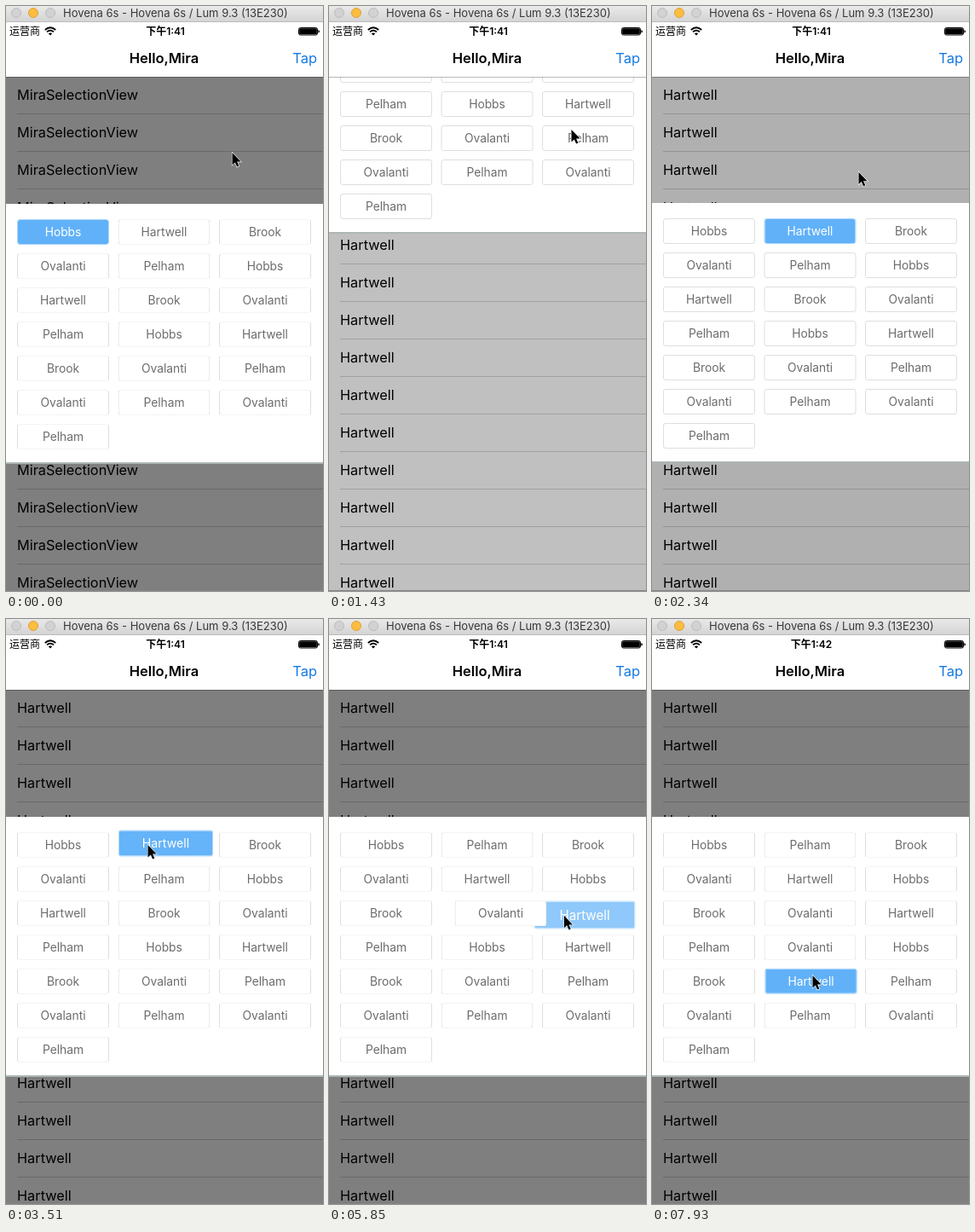
An HTML page that plays this animation: 372x686 px, repeating every 8 s.

```html
<!DOCTYPE html>
<html lang="zh-CN">
<head>
<meta charset="utf-8">
<title>Selection panel</title>
<style>
  html, body { margin: 0; width: 100%; height: 100%; overflow: hidden; background: #fff; }
  #stage {
    position: relative; width: 372px; height: 686px; overflow: hidden; background: #fff;
    font-family: Inter, "Noto Sans CJK SC", "Noto Sans CJK", sans-serif; color: #000; white-space: nowrap;
  }
  #stage div, #stage svg { position: absolute; box-sizing: border-box; }
  #list { left: 0; top: 83px; width: 100%; height: 603px; }
  .row { left: 13px; right: 0; height: 44px; line-height: 43px; font-size: 16.3px; border-bottom: 1px solid #d4d4d6; }
  #dim { left: 0; top: 83px; width: 100%; height: 603px; background: #000; }
  #edge { left: 0; bottom: 0; width: 100%; height: 1px; background: #848484; }
  #panel { left: 0; top: 0; width: 100%; height: 305px; background: #fff; border-bottom: 2px solid #aeb6b6; }
  .tile {
    left: 0; top: 0; width: 108px; height: 30px; border: 1px solid #dedede; border-radius: 3px;
    background: #fff; color: #6c6c6c; font-size: 13.8px; line-height: 28px; text-align: center;
  }
  .faint .tile { border-top-color: #f4f4f4; border-bottom-color: #f4f4f4; }
  #panel .picked { border-color: #a9d5fb; background: #61b1f8; background-clip: padding-box; color: #fff; }
  #nav {
    left: 0; top: 19px; width: 100%; height: 65px; background: #fff; background-clip: padding-box;
    border-bottom: 1px solid rgba(0, 0, 0, .28);
  }
  #carrier, #clock { top: 2px; line-height: 17px; font-size: 12px; }
  #carrier { left: 4px; }
  #clock { left: 0; width: 374px; text-align: center; font-weight: 600; }
  #heading { left: 0; top: 20px; width: 371px; line-height: 44px; text-align: center; font-size: 16.5px; font-weight: 600; }
  #tap { right: 7px; top: 20px; line-height: 44px; font-size: 16.5px; color: #1678e2; }
  #bar {
    left: 0; top: 0; width: 100%; height: 19px; border-bottom: 1px solid #bcbcbc;
    background: linear-gradient(#e9e9e9, #d4d4d4);
  }
  #bar .light { top: 2px; width: 12px; height: 12px; border-radius: 50%; background: #d2d2d2; border: 1px solid #bcbcbc; }
  #bar .amber { background: #fcbd40; border-color: #e0a136; }
  #caption { left: 67px; top: 0; line-height: 17px; font-size: 13px; color: #383838; }
  #cursor { left: 0; top: 0; overflow: visible; }
</style>
</head>
<body>
<div id="stage">
  <div id="list"></div>
  <div id="dim"></div>
  <div id="edge"></div>
  <div id="panel"></div>
  <div id="nav">
    <div id="carrier">运营商</div>
    <svg style="left:45px;top:5px" width="14" height="11" fill="none" stroke="#000" stroke-width="1.8">
      <path d="M.8 4Q7-1.6 13.2 4M3 6.4Q7 2.8 11 6.4"/>
      <path d="M7 10.6L4.8 8.3Q7 6.5 9.2 8.3Z" fill="#000" stroke="none"/>
    </svg>
    <div id="clock"></div>
    <svg style="left:343px;top:6px" width="26" height="10">
      <rect x=".5" y=".5" width="22" height="8.5" rx="2" fill="none" stroke="#000"/>
      <rect x="1.2" y="1.2" width="20.6" height="7.1" rx="1"/>
      <path d="M23.4 3Q25 3.4 25 4.8T23.4 6.5Z"/>
    </svg>
    <div id="heading">Hello,Mira</div>
    <div id="tap">Tap</div>
  </div>
  <div id="bar">
    <div class="light" style="left:6px"></div>
    <div class="light amber" style="left:26px"></div>
    <div class="light" style="left:46px"></div>
    <div id="caption">Hovena 6s - Hovena 6s / Lum 9.3 (13E230)</div>
  </div>
  <svg id="cursor" width="12" height="19">
    <path d="M-.5 0V14.4L2.8 11.4L5.1 16.6L7.3 15.6L5.1 10.6H9.6Z" stroke="#fff" stroke-width="1.2" paint-order="stroke"/>
  </svg>
</div>
<script>
const LOOP = 8000, STEP = 130;
const PICK = 1040, CLOSE = 1128, OPEN = 1820, LIFT = 3415, DROP = 7670, MINUTE = 6370;
const OPEN_Y = 232, TRAVEL = 535, HELD = 1;
const NAMES = ['Hobbs', 'Hartwell', 'Brook', 'Ovalanti', 'Pelham'];
const TILE_NAMES = [...NAMES, ...NAMES, ...NAMES, 'Ovalanti', 'Pelham', 'Ovalanti', 'Pelham'];

// [time, x, y] of the pointer tip
const POINTER = [
  [0, 266, 172], [390, 266, 172], [650, 240, 205], [910, 202, 258], [1170, 202, 258],
  [1430, 285, 145], [1650, 347, 60], [1820, 347, 62], [2080, 299, 134], [2470, 215, 225],
  [2860, 167, 264], [3510, 167, 265], [3900, 164, 295], [4200, 155, 307], [4550, 88, 338],
  [4810, 72, 350], [5000, 82, 350], [5300, 165, 348], [5700, 268, 346], [5950, 282, 349],
  [6250, 282, 380], [6500, 268, 391], [6760, 210, 393], [7000, 172, 393], [7350, 182, 414],
  [7600, 189, 418], [8000, 189, 418]
];
// [time, slot the held tile trades into]
const SWAPS = [[3900, 4], [4500, 6], [5200, 7], [5650, 8], [6250, 11], [6890, 10], [7300, 13]];

const $ = id => document.getElementById(id);
const mix = (a, b, k) => a + (b - a) * k;
const ramp = (t, from, length) => Math.min(1, Math.max(0, (t - from) / length));
const ease = k => k * k * (3 - 2 * k);
const easeOut = k => 1 - (1 - k) ** 2;
const slotAt = i => [13 + 118.5 * (i % 3), 18 + 40 * Math.floor(i / 3)];
const between = (a, b, k) => a.map((v, i) => mix(v, b[i], k));

function add(parent, cls, text) {
  const el = document.createElement('div');
  el.className = cls;
  el.textContent = text;
  parent.append(el);
  return el;
}

const rows = [...Array(14).keys()].map(i => {
  const row = add($('list'), 'row', '');
  row.style.top = i * 44 + 'px';
  return row;
});
const tiles = TILE_NAMES.map(name => add($('panel'), 'tile', name));

// Each swap sends the displaced tile to the slot the held one leaves.
const moves = [];
const order = tiles.map((_, i) => i);
let heldSlot = HELD;
for (const [time, slot] of SWAPS) {
  moves[order[slot]] = { time, from: slot, to: heldSlot };
  order[heldSlot] = order[slot];
  order[slot] = HELD;
  heldSlot = slot;
}

function pointerAt(t) {
  const i = Math.max(1, POINTER.findIndex(p => p[0] > t));
  const [a, b] = [POINTER[i - 1], POINTER[i]];
  return between(a.slice(1), b.slice(1), ramp(t, a[0], b[0] - a[0]));
}

function panelY(t) {
  if (t < OPEN) return OPEN_Y - TRAVEL * ease(ramp(t, CLOSE, 600));
  const s = 16.2 * (t - OPEN) / 1000;
  return OPEN_Y - TRAVEL * (1 + s) * Math.exp(-s);
}

function dimAt(t) {
  return 0.5 * (t < OPEN ? 1 - ease(ramp(t, CLOSE, 600)) : ease(ramp(t, OPEN, 900)));
}

function heldTile(t, [px, py]) {
  const late = ramp(t, 4900, 1800);
  const dragged = [px + mix(20.5, 26.5, late) - 54, py + mix(-2, 0.5, late) - 15 - OPEN_Y];
  const lift = ease(ramp(t, LIFT, 260)), land = easeOut(ramp(t, DROP, 320));
  const pos = t < LIFT ? slotAt(HELD) : between(dragged, slotAt(heldSlot), land);
  return { pos, raised: lift * (1 - land) };
}

function place(el, [x, y], scale = 1) {
  el.style.transform = `translate(${x}px, ${y}px) scale(${scale})`;
}

function draw(t) {
  const pointer = pointerAt(t);
  const label = t < PICK ? 'MiraSelectionView' : 'Hartwell';
  rows.forEach(row => { row.textContent = label; });
  $('dim').style.opacity = dimAt(t);
  place($('panel'), [0, Math.round(panelY(t))]);
  $('panel').className = t < PICK || t > 2700 ? 'faint' : '';

  tiles.forEach((tile, i) => {
    tile.classList.toggle('picked', i === (t < PICK ? 0 : HELD));
    const move = moves[i];
    if (i !== HELD) {
      place(tile, move
        ? between(slotAt(move.from), slotAt(move.to), ease(ramp(t, move.time, 260)))
        : slotAt(i));
    }
  });
  const { pos, raised } = heldTile(t, pointer);
  place(tiles[HELD], pos, 1 + 0.1 * raised);
  tiles[HELD].style.opacity = 1 - 0.3 * raised ** 2;

  $('clock').textContent = t < MINUTE ? '下午1:41' : '下午1:42';
  $('tap').style.opacity = t < 1690 ? 1 : mix(0.25, 1, ramp(t, OPEN, 480));
  place($('cursor'), pointer);
}

function tick(now) {
  draw(Math.floor((now % LOOP) / STEP) * STEP);
  requestAnimationFrame(tick);
}
draw(0);
requestAnimationFrame(tick);
</script>
</body>
</html>
```
